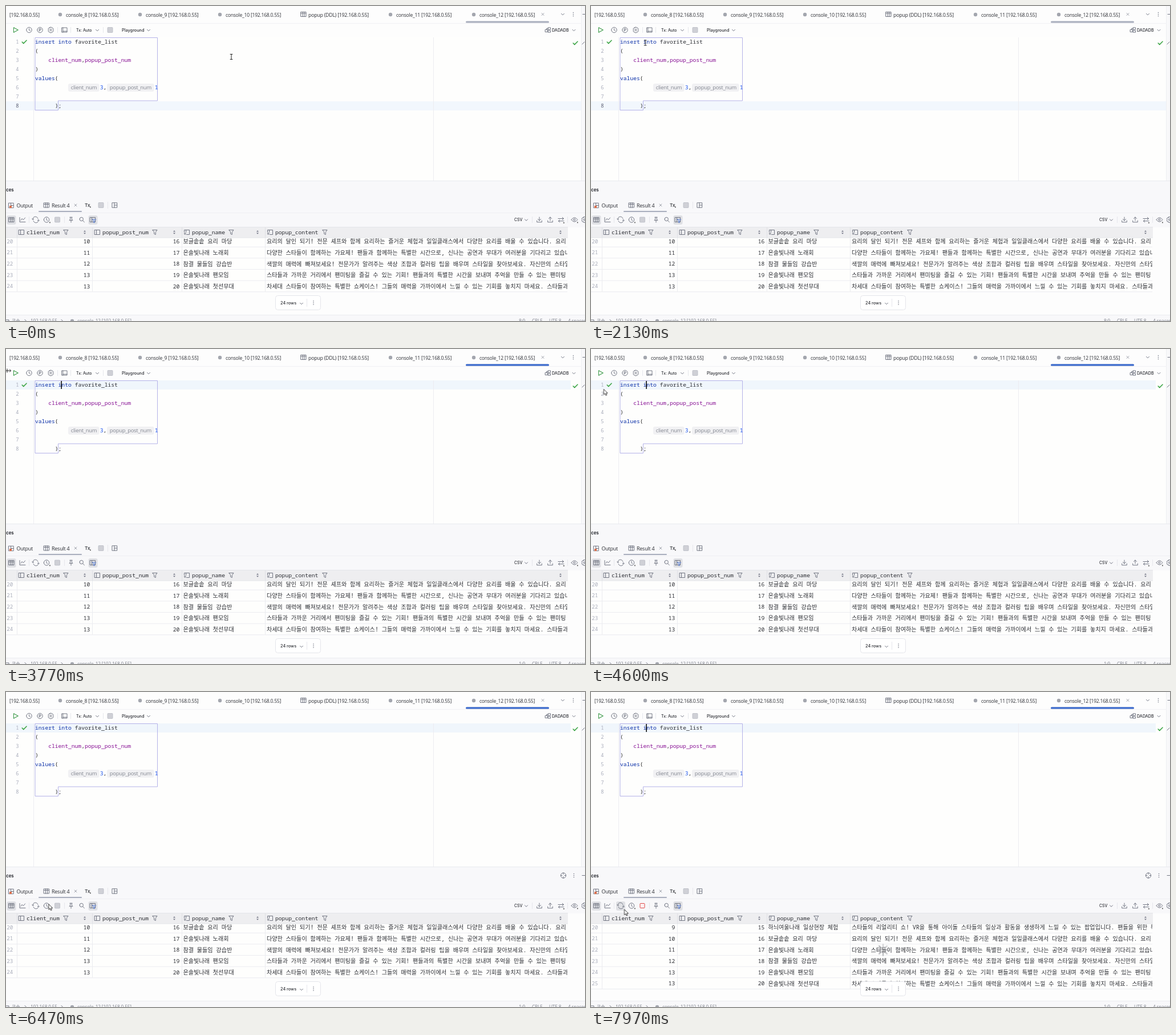
Write an HTML page that moves like this. It is 1015 px wide and 552 px high and loops after 8000 ms.

```html
<!DOCTYPE html>
<html>
<head>
<meta charset="utf-8">
<title>Query console</title>
<style>
html, body { margin: 0; width: 100%; height: 100%; overflow: hidden; background: #f8f8fa; }
svg { display: block; width: 100%; height: 100%; }
text { white-space: pre; fill: #2b2d33; }
.ui { font-family: "Open Sans", "Noto Sans", sans-serif; letter-spacing: -.025em; }
.in { font-family: Inter, sans-serif; font-weight: 500; }
.mono { font-family: "Noto Sans Mono", "DejaVu Sans Mono", monospace; font-weight: 500; }
.ko { font-family: "Noto Sans Mono", "Noto Sans CJK KR", "Noto Sans CJK", monospace; word-spacing: -.3px; }
.key { fill: #0a2fa8; } .col { fill: #871094; } .num { fill: #1750eb; }
.dim { fill: #a9adbb; } .cur { fill: #767a8a; } .hint { fill: #81858f; } .end { text-anchor: end; }
.ic { fill: none; stroke: #6c707e; stroke-width: .95; stroke-linecap: round; stroke-linejoin: round; }

/* states of the 8 s loop */
.st { animation: 8s step-end infinite; }
.blurred { animation-name: blurred; }
.focused { animation-name: focused; }
.blink { animation: blink 1s step-end infinite; }
.hoverLayout { animation-name: hoverLayout; }
.hoverRefresh { animation-name: hoverRefresh; }
.idle { animation-name: idle; }
.busy { animation-name: busy; }
.oldRows { animation-name: oldRows; }
.newRows { animation-name: newRows; }
.panel { animation: panel 8s linear infinite; }
.spoke { animation: spoke 1s linear infinite; }
.mouse { animation: mouse 8s ease-in-out infinite; }
.beam { animation-name: beam; }
.arrow { animation-name: arrow; }
.resize { animation-name: resize; }

@keyframes blurred { 0% { opacity: 1 } 43.75%, 100% { opacity: 0 } }
@keyframes focused { 0% { opacity: 0 } 43.75%, 100% { opacity: 1 } }
@keyframes blink { 0% { opacity: 0 } 50%, 100% { opacity: 1 } }
@keyframes hoverLayout { 0% { opacity: 0 } 70% { opacity: 1 } 75%, 100% { opacity: 0 } }
@keyframes hoverRefresh { 0% { opacity: 0 } 82%, 100% { opacity: 1 } }
@keyframes idle { 0% { opacity: 1 } 95%, 100% { opacity: 0 } }
@keyframes busy { 0% { opacity: 0 } 95%, 100% { opacity: 1 } }
@keyframes oldRows { 0% { opacity: 1 } 97.5%, 100% { opacity: 0 } }
@keyframes newRows { 0% { opacity: 0 } 97.5%, 100% { opacity: 1 } }
@keyframes panel { 0%, 70.5% { opacity: 0 } 75%, 100% { opacity: 1 } }
@keyframes spoke { from { opacity: .9 } to { opacity: .4 } }
@keyframes mouse {
  0%, 2% { transform: translate(395px, 89px) }
  13%, 18% { transform: translate(76px, 72px) }
  30%, 43.75% { transform: translate(99px, 63px) }
  46.5%, 53.75% { transform: translate(3px, 38px) }
  70.5%, 73% { transform: translate(189px, 350px) }
  84%, 95% { transform: translate(52px, 376px) }
  98.5%, 100% { transform: translate(58.5px, 381px) }
}
@keyframes beam { 0% { opacity: 1 } 45.1% { opacity: 0 } 59.3% { opacity: 1 } 66.3%, 100% { opacity: 0 } }
@keyframes arrow { 0% { opacity: 0 } 45.1% { opacity: 1 } 46.1% { opacity: 0 } 55% { opacity: 1 } 59.3% { opacity: 0 } 66.3%, 100% { opacity: 1 } }
@keyframes resize { 0% { opacity: 0 } 46.1% { opacity: 1 } 55%, 100% { opacity: 0 } }
</style>
</head>
<body>
<svg id="stage" viewBox="0 0 1015 552" preserveAspectRatio="none"></svg>
<script>
const text = (x, y, size, cls, s) => `<text x="${x}" y="${y}" font-size="${size}" class="${cls}">${s}</text>`;
const rect = (x, y, w, h, fill, extra = '') => `<rect x="${x}" y="${y}" width="${w}" height="${h}" fill="${fill}" ${extra}/>`;
const icon = (x, y, d, extra = '') => `<path class="ic" transform="translate(${x} ${y})" d="${d}" ${extra}/>`;
const state = (name, body) => `<g class="st ${name}">${body}</g>`;
const hline = (x, y, w, c = '#e6e7ec') => rect(x, y, w, 1, c);
const vline = (x, y, h, c = '#e6e7ec') => rect(x, y, 1, h, c);

const ring = r => `M${-r} 0a${r} ${r} 0 1 0 ${2 * r} 0a${r} ${r} 0 1 0 ${-2 * r} 0`;
const shape = {
  chev: 'M-2.5-1.2L0 1.3L2.5-1.2',
  close: 'M-2-2L2 2M2-2L-2 2',
  grid: 'M-4.5-4h9v8h-9zM-4.5-1.5h9M-1.5-4v8M1.5-4v8',
  column: 'M-4.5-4h9v8h-9zM-1.5-4v8',
  keyed: 'M-4.5 0V-4h9v8h-5M-1.5-4v4M-4.5 2.5a1.3 1.3 0 1 0 2.6 0a1.3 1.3 0 1 0-2.6 0',
  funnel: 'M-4-4H4L1.3-.2V4L-1.3 2.8V-.2Z',
  clock: ring(4.7) + 'M0-2.7V.3L2 1.5',
  param: ring(4.7) + 'M-1.2 2.4V-2.4H.5a1.3 1.3 0 0 1 0 2.7H-1.2',
  gear: 'M-1.3-4.8h2.6l.5 1.4 1.5-.3 1.4 2.3-1 1.4 1 1.4-1.4 2.3-1.5-.3-.5 1.4h-2.6l-.5-1.4-1.5.3-1.4-2.3 1-1.4-1-1.4 1.4-2.3 1.5.3z' + ring(1.5),
  frame: 'M-4.5-4h9v8h-9zM-2.7-4v8M-2.7 2.2h7.2',
  layout: 'M-4.2-4.2h8.4v8.4h-8.4zM-.5-4.2v8.4M-.5 0h4.7',
  chart: 'M-5-4V4H5M-3 1L-.8-2L1.3.3L4.6-3.5',
  refresh: 'M-5-.5A4.5 4 0 0 1 4-2M5 .5A4.5 4 0 0 1-4 2M-6.3-1.6l1.3 1.6L-3.3-1.4M6.3 1.6L5 0L3.3 1.4',
  pin: 'M-2-4.3h4M-1.3-4.3v3.6L-3 1H3L1.3-.7v-3.6M0 1v3.7',
  search: 'M-4-1a3.2 3.2 0 1 0 6.4 0a3.2 3.2 0 1 0-6.4 0M1.6 1.5L4.4 4.3',
  down: 'M0-4.5V1.5M-2.6-1L0 1.6L2.6-1M-4.3 1.5V4.3H4.3V1.5',
  up: 'M0 1.5V-4.5M-2.6-2L0-4.6L2.6-2M-4.3 1.5V4.3H4.3V1.5',
  compare: 'M-5-2H4.5M2.3-4.2L4.5-2L2.3.2M5 2.3H-4.5M-2.3.2L-4.5 2.3L-2.3 4.5',
  eye: 'M-5.5 0Q0-7.5 5.5 0Q0 7.5-5.5 0' + ring(1.6),
  check: 'M-3.8 0L-1.3 2.6L4-2.8',
  play: 'M-3.6-4.3L4.2 0L-3.6 4.3Z',
  schema: 'M-4.5-.5h4v4h-4zM.5-4.2h4v3.5h-4zM.5 1h4v3.2h-4zM-2.5-.5V-2.6H.5',
  target: ring(4.6) + 'M0-4.6v2.5M0 4.6v-2.5M-4.6 0h2.5M4.6 0h-2.5',
  minus: 'M-3 0H3'
};
const ico = (name, x, y, color, width = .95) => icon(x, y, shape[name], color ? `style="stroke:${color};stroke-width:${width}"` : '');
const dots = (x, y) => [-3, 0, 3].map(d => `<circle cx="${x}" cy="${y + d}" r=".8" fill="#6c707e"/>`).join('');
const sorter = (x, y) => `<path d="M${x - 2} ${y - 1}l2-2.3l2 2.3zM${x - 2} ${y + 1}l2 2.3l2-2.3z" fill="#6c707e"/>`;
const hover = (x, y) => rect(x - 8, y - 8, 16, 16, '#dfe0e4', 'rx="3"');
const stop = (x, y) => rect(x - 4.5, y - 4.5, 9, 9, '#cfd0d6', 'rx="1" stroke="#b9bbc4" stroke-width=".8"');

function tabs() {
  const ip = '[192.168.0.55]';
  const list = [['console_8', 105], ['console_9', 245], ['console_10', 385], ['console_11', 684], ['console_12', 830]];
  return text(6, 18.7, 8.45, 'ui', ip) +
    list.map(([name, x]) => `<circle cx="${x - 10}" cy="15" r="3.2" fill="#a3a6ae"/>` + text(x, 18.7, 8.5, 'ui', `${name} ${ip}`)).join('') +
    ico('grid', 521.5, 14.5) + text(530, 18.7, 8.75, 'ui', `popup (DDL) ${ip}`) +
    ico('close', 941, 14.5, '#9a9da8') + ico('chev', 976, 14.5) + dots(994.5, 14.5) + ico('minus', 1014, 14.5) +
    rect(806, 26.5, 146, 3, '#a8adbd', 'rx="1.5"') +
    state('focused', rect(806, 26.5, 146, 3, '#3a6bd0', 'rx="1.5"')) + hline(0, 30, 1009, '#f1f1f4');
}

function toolbar() {
  return ico('play', 17, 42, '#3f9b4b', 1.1) + ico('clock', 40.5, 42) + ico('param', 59.5, 42) + ico('gear', 78.5, 42) +
    vline(90, 37, 10) + ico('frame', 102.5, 42) + vline(113, 37, 10) +
    text(123, 44.5, 6.9, 'in', 'Tx: Auto') + ico('chev', 160, 42.5) + vline(170, 37, 10) + stop(182.5, 42) +
    text(203, 44.5, 7.3, 'in', 'Playground') + ico('chev', 250, 42.5) +
    ico('schema', 950, 42) + text(957, 44.5, 7.1, 'in', 'DADADB') + ico('chev', 995.5, 42.5);
}

function editor() {
  const code = (col, line, cls, s) => text(51 + col * 5.8, 50.2 + line * 16, 9.67, 'mono ' + cls, s);
  const lineNo = (n, cls) => text(22.5, 50.2 + n * 16, 8.8, 'mono end ' + cls, n);
  const hint = (x, w, s) => rect(x, 136, w, 14, '#f1f1f3', 'rx="3"') + text(x + 4.7, 146.2, 9.4, 'ui hint', s);
  return rect(0, 55, 1008, 251, '#fefefd') +
    state('blurred', rect(0, 167, 1008, 16, '#f2f7fd')) +
    state('focused', rect(0, 55, 990, 16, '#f0f6fc')) +
    vline(48, 55, 251, '#eeeef2') + vline(749, 55, 251, '#ececf1') +
    '<path d="M51 55.5H265.5V166H91.5V182.5H51Z" fill="none" stroke="#b4b2e8"/>' +
    [1, 2, 3, 4, 5, 6, 7, 8].map(n => lineNo(n, 'dim')).join('') +
    state('blurred', lineNo(8, 'cur')) +
    code(0, 1, 'key', 'insert into') + code(12, 1, '', 'favorite_list') +
    code(0, 2, '', '(') + code(4, 3, 'col', 'client_num<tspan fill="#222">,</tspan>popup_post_num') +
    code(0, 4, '', ')') + code(0, 5, 'key', 'values<tspan fill="#222">(</tspan>') +
    hint(109, 54.5, 'client_num') + text(164.8, 146.2, 9.67, 'mono num', '3<tspan fill="#222">,</tspan>') +
    hint(177, 82.5, 'popup_post_num') + text(260.7, 146.2, 9.67, 'mono num', '1') +
    code(6, 8, '', ');') +
    state('idle', ico('check', 32, 63, '#3fa648', 1.6)) +
    ico('check', 998, 65, '#3fa648', 1.6) + icon(1012, 65, 'M-2 2L2-2') +
    state('focused', `<g class="blink">${rect(96.4, 56, 1.5, 14, '#000')}</g>`);
}

const data = [
  [9, 15, '하늬여울나래 일상현장 체험', '스타들의 리얼리티 쇼! VR을 통해 아이돌 스타들의 일상과 활동을 생생하게 느낄 수 있는 팝업입니다. 팬들을 위한 특별한'],
  [10, 16, '보글솥솥 요리 마당', '요리의 달인 되기! 전문 셰프와 함께 요리하는 즐거운 체험과 일일클래스에서 다양한 요리를 배울 수 있습니다. 요리'],
  [11, 17, '은솔빛나래 노래회', '다양한 스타들이 함께하는 가요제! 팬들과 함께하는 특별한 시간으로, 신나는 공연과 무대가 여러분을 기다리고 있습니다'],
  [12, 18, '참결 물들임 강습반', '색깔의 매력에 빠져보세요! 전문가가 알려주는 색상 조합과 컬러링 팁을 배우며 스타일을 찾아보세요. 자신만의 스타일'],
  [13, 19, '은솔빛나래 팬모임', '스타들과 가까운 거리에서 팬미팅을 즐길 수 있는 기회! 팬들과의 특별한 시간을 보내며 추억을 만들 수 있는 팬미팅'],
  [13, 20, '은솔빛나래 첫선무대', '차세대 스타들이 참여하는 특별한 쇼케이스! 그들의 매력을 가까이에서 느낄 수 있는 기회를 놓치지 마세요. 스타들과']
];

function rows(list) {
  const pitch = 19.65, h = list.length * pitch;
  return rect(0, 402.5, 985, h, '#fefefd') +
    [19, 151, 308, 454, 984].map(x => vline(x, 402.5, h, '#ebecf0')).join('') +
    list.map(([client, post, name, content], i) => {
      const y = 416 + i * pitch;
      return hline(0, y + 5.7, 985, '#ebecf0') +
        text(12.3, y - .3, 9.2, 'mono dim end', 20 + i) +
        text(147.3, y, 9.67, 'mono end', client) + text(304.3, y, 9.67, 'mono end', post) +
        text(310.5, y + .4, 10.08, 'ko', name) + text(457, y + .4, 10.08, 'ko', content);
    }).join('');
}

function table() {
  const head = [['column', 27, 36, 'client_num', 105, 138], ['column', 160, 169, 'popup_post_num', 261, 295],
    ['keyed', 317, 326, 'popup_name', 395, 441], ['keyed', 463, 472, 'popup_content', 559, 972]];
  const spokes = [...Array(8).keys()].map(i =>
    `<g transform="rotate(${i * 45})"><path class="spoke" d="M0-4.5V-9.5" stroke="#a2a3a8" stroke-width="2.6" stroke-linecap="round" style="animation-delay:${i / 8 - 1}s"/></g>`).join('');
  return rect(0, 388, 1015, 153, '#fdfdfd') +
    `<g clip-path="url(#cells)">${state('oldRows', rows(data.slice(1)))}${state('newRows', rows(data))}</g>` +
    rect(0, 387, 985, 19, '#eeeef0') + hline(0, 387, 985, '#e4e5e9') + hline(0, 405.5, 985, '#e4e5e9') +
    [19, 151, 308, 454].map(x => vline(x, 388, 18, '#dfe0e5')).join('') +
    head.map(([kind, ix, x, name, fx, sx]) => ico(kind, ix, 396.5) + text(x, 400, 9.67, 'mono', name) + ico('funnel', fx, 396.5) + sorter(sx, 396.5)).join('') +
    state('newRows', `<g transform="translate(512 452)">${spokes}</g>`) +
    rect(472.5, 507.5, 79, 25, '#fff', 'rx="4" stroke="#e4e5ea"') +
    text(481, 523.4, 7.3, 'in', '24 rows') + ico('chev', 518, 521.5) + vline(527, 513, 14) + dots(539, 520);
}

function services() {
  return rect(0, 306, 1015, 82, '#f8f8fa') + hline(0, 306, 1015, '#e9eaef') +
    `<text x="13.7" y="325.1" font-size="7.7" class="in end" style="font-weight:700">ces</text>` +
    `<g class="panel">${ico('target', 977, 321.5)}${dots(995.5, 321.5)}${ico('minus', 1013, 321.5)}</g>` +
    ico('layout', 9, 349.5) + rect(6, 350, 4, 4, '#d9704f') + text(18.5, 353.4, 9, 'ui', 'Output') +
    ico('grid', 71, 349) + text(80, 353.4, 8.95, 'ui', 'Result 4') + ico('close', 122, 349, '#9a9da8') +
    rect(57, 359, 76, 2, '#a8adbd', 'rx="1"') + hline(0, 362, 1015, '#eeeff3') +
    text(138, 352, 8.2, 'in', 'Tx') + rect(147, 351.5, 1.8, 1.8, '#555') + stop(166.5, 349) + vline(178, 343, 12) +
    state('hoverLayout', hover(190.5, 349)) + ico('layout', 190.5, 349) +
    hover(9.5, 375) + ico('grid', 9.5, 374.5) + ico('chart', 29, 374.5) + vline(40, 369, 11) +
    state('hoverRefresh', hover(52, 375)) + ico('refresh', 52, 374.5) + ico('clock', 71, 374.5) + rect(76, 378.5, 1.8, 1.8, '#555') +
    state('idle', stop(90, 374.5)) +
    state('busy', rect(86, 370.5, 8, 8, '#fdf1f1', 'rx="1" stroke="#dc4a4a"')) +
    vline(102, 369, 11) + ico('pin', 114, 374.5) + ico('search', 133, 374.5) +
    hover(152.5, 375) + ico('column', 152, 374.5) + icon(154.5, 376.5, 'M-3-2.5H3L.8 0V3H-.8V0Z', 'style="fill:#e8eefc;stroke:#4a6fc4"') +
    text(891, 377.3, 6.9, 'in', 'CSV') + ico('chev', 912, 375) + vline(922, 369, 11) +
    ico('down', 935, 374.5) + ico('up', 954, 374.5) + ico('compare', 973, 374.5) + rect(977, 379, 1.8, 1.8, '#555') + vline(984, 369, 11) +
    ico('eye', 996.5, 374.5) + rect(1001, 378.5, 1.8, 1.8, '#555') + ico('gear', 1014, 374.5);
}

function statusBar() {
  const s = (x, t) => text(x, 555.2, 8.3, 'ui hint', t);
  return rect(0, 541, 1015, 11, '#f8f8fa') + hline(0, 541, 1015, '#ebecf0') +
    icon(3, 553, 'M-4-3H2V3') + text(10, 555.2, 8, 'ko hint', '콘솔') + icon(34, 552, 'M-1-2.5L1.5 0') + s(43, '192.168.0.55') +
    icon(98, 552, 'M-1-2.5L1.5 0') + '<circle cx="116" cy="552" r="3.2" fill="#a3a6ae"/>' + s(125, 'console_12 [192.168.0.55]') +
    state('blurred', s(899, '8:9')) + state('focused', s(899, '1:9')) +
    s(922, 'CRLF') + s(952, 'UTF-8') + s(985, '4 spaces');
}

const mouse = `<g class="mouse">` +
  state('beam', '<path d="M-2.3-4.5H2.3M0-4.5V4.5M-2.3 4.5H2.3" fill="none" stroke="#222"/>') +
  state('arrow', '<path d="M0 0V9.6L2.3 7.6L3.8 11L5.4 10.3L4 7H7Z" fill="#fff" stroke="#222" stroke-width=".9"/>') +
  state('resize', '<path d="M-6 0H5.5M3.3-2.3L5.7 0L3.3 2.3M-3.7-2.3L-6 0L-3.7 2.3M-1-3.5V3.5" fill="none" stroke="#222"/>') + '</g>';

document.getElementById('stage').innerHTML =
  '<clipPath id="cells"><rect x="0" y="400" width="983.5" height="141"/></clipPath>' +
  rect(0, 0, 1015, 552, '#f8f8fa') + rect(0, 0, 1009, 306, '#fdfdfd') + vline(1008, 0, 306, '#eeeff3') +
  tabs() + toolbar() + editor() + services() + table() + statusBar() + mouse;
</script>
</body>
</html>
```
